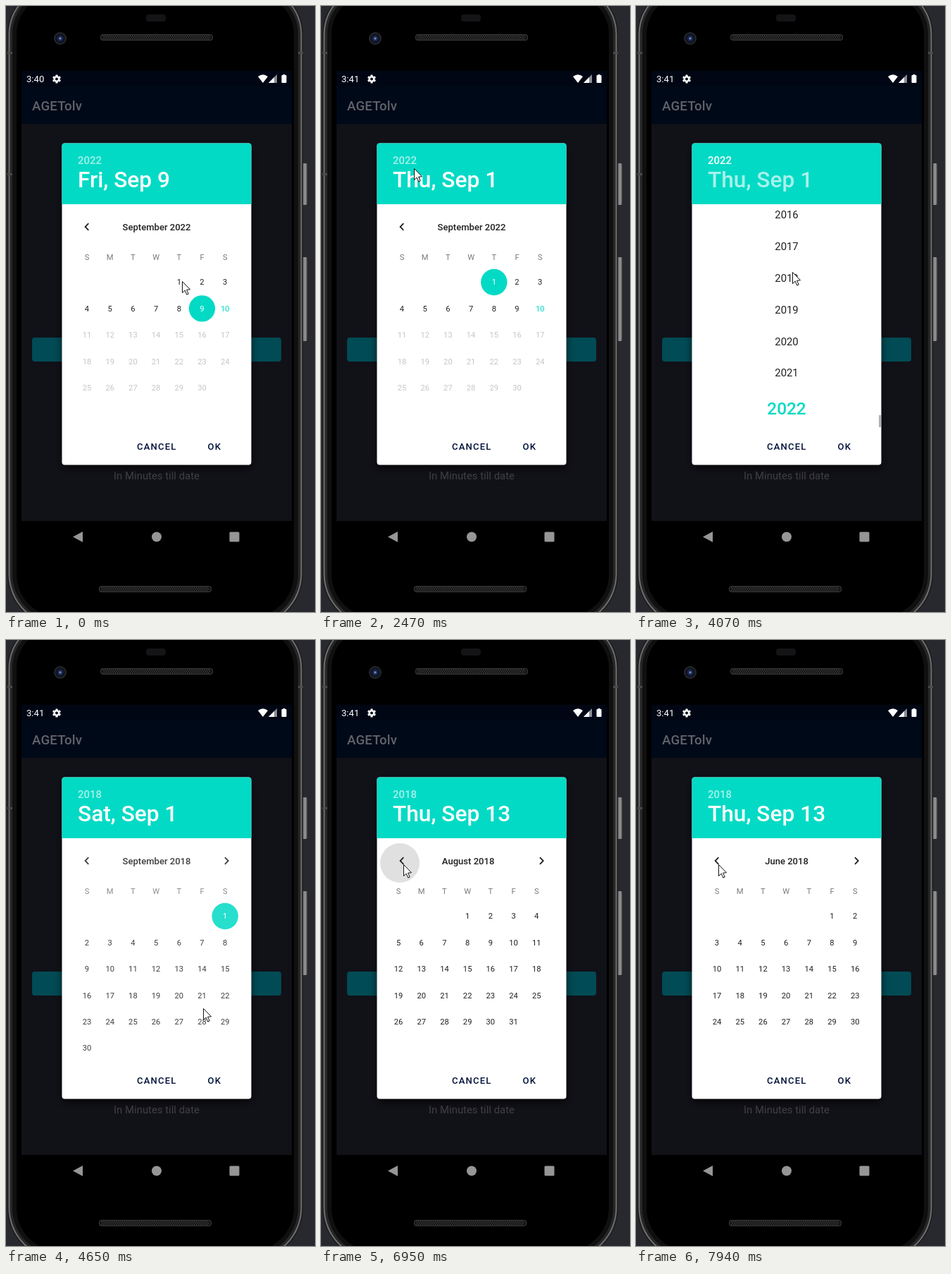
An HTML page with a canvas that plays this animation: 439x859 px, repeating every 8 s.

```html
<!DOCTYPE html>
<html lang="en">
<head>
<meta charset="utf-8">
<title>Date picker</title>
<style>
html, body { margin: 0; width: 100%; height: 100%; overflow: hidden; background: #28282f; }
canvas { display: block; }
</style>
</head>
<body>
<canvas id="stage"></canvas>
<script>
const W = 439, H = 859, LOOP = 8000;
const STEP = 144.6, LEAD = 15;
const TEAL = '#03dac5', INK = '#212121', NAVY = '#00113a';
const MONTHS = ['January', 'February', 'March', 'April', 'May', 'June', 'July',
  'August', 'September', 'October', 'November', 'December'];
const DAYS = ['Sun', 'Mon', 'Tue', 'Wed', 'Thu', 'Fri', 'Sat'];
const TODAY = new Date(2022, 8, 10);

// All times below are in steps.
const YEARS_OPEN = 21, YEARS_CLOSE = 31;
const BACK_PRESSES = [47, 50, 53];
const PICKS = [
  { from: 0, date: new Date(2022, 8, 9) },
  { from: 2, date: new Date(2022, 8, 1), press: true },
  { from: YEARS_CLOSE, date: new Date(2018, 8, 1) },
  { from: 42, date: new Date(2018, 8, 13), press: true }
];
const MOVES = [
  { from: 0, to: 1, x: 250, y: 390 },
  { from: 5, to: 9, x: 200, y: 249 },
  { from: 10, to: 12, x: 203, y: 254 },
  { from: 13, to: 17, x: 132, y: 230 },
  { from: 19, to: 21, x: 125, y: 217 },
  { from: 24, to: 28, x: 222, y: 377 },
  { from: 31, to: 33, x: 322, y: 628 },
  { from: 35, to: 39, x: 237, y: 467 },
  { from: 43, to: 47, x: 117, y: 318 }
];

const canvas = document.getElementById('stage');
const ratio = window.devicePixelRatio || 1;
canvas.width = W * ratio;
canvas.height = H * ratio;
canvas.style.width = W + 'px';
canvas.style.height = H + 'px';
const ctx = canvas.getContext('2d');

const clamp = v => Math.min(1, Math.max(0, v));
const easeOut = u => 1 - (1 - u) ** 1.25;
const sameDay = (a, b) => a.getTime() === b.getTime();
const pickAt = step => PICKS.filter(p => p.from <= step).pop().date;

function cursorAt(step) {
  let { x, y } = MOVES[0];
  for (const move of MOVES) {
    const k = easeOut(clamp((step - move.from) / (move.to - move.from)));
    x += (move.x - x) * k;
    y += (move.y - y) * k;
  }
  return [Math.round(x), Math.round(y)];
}

// The new month glides in from the left with a quintic ease.
function pageAt(step) {
  const ages = BACK_PRESSES.map(p => step - p).filter(age => age > 0);
  const shift = ages.length ? -268 * (1 - clamp(ages.pop() * .55)) ** 5 : 0;
  const turned = BACK_PRESSES.filter(p => step > p).length;
  return { year: step < YEARS_CLOSE ? 2022 : 2018, month: 8 - turned, shift };
}

function viewAt(step) {
  const closing = step >= YEARS_CLOSE;
  const sinceClose = step - YEARS_CLOSE + .8;
  return {
    calendar: clamp(closing ? sinceClose * .48 : 1 - (step - YEARS_OPEN) * .32),
    years: clamp(closing ? 1 - sinceClose * .8 : (step - YEARS_OPEN - 1.7) * .65),
    pressed: step >= YEARS_OPEN && step < YEARS_OPEN + 4,
    yearMode: step > YEARS_OPEN && !closing
  };
}

function rect(x, y, w, h, r, fill) {
  ctx.beginPath();
  ctx.roundRect(x, y, w, h, r);
  ctx.fillStyle = fill;
  ctx.fill();
}

function disc(x, y, r, fill) {
  ctx.beginPath();
  ctx.arc(x, y, r, 0, Math.PI * 2);
  ctx.fillStyle = fill;
  ctx.fill();
}

function poly(points, fill) {
  ctx.beginPath();
  points.forEach(([x, y]) => ctx.lineTo(x, y));
  ctx.closePath();
  ctx.fillStyle = fill;
  ctx.fill();
}

// y is the middle of the capitals; baselines sit on whole pixels
function text(str, x, y, size, color, { weight = 400, align = 'left', spacing = 0 } = {}) {
  ctx.font = `${weight} ${size}px Roboto, sans-serif`;
  ctx.textAlign = align;
  ctx.letterSpacing = spacing + 'px';
  ctx.fillStyle = color;
  ctx.fillText(str, x, Math.round(y + size * .356));
}

function speaker(x, y) {
  rect(x, y, 160, 9, 4, '#3a3a3a');
  rect(x + 1, y + 1, 158, 7, 3, '#151515');
  ctx.fillStyle = '#414141';
  for (let row = 0; row < 3; row++)
    for (let i = 0; i < 51; i++)
      ctx.fillRect(x + 3 + i * 3 + (row % 2) * 1.5, y + 1.5 + row * 2.2, 1.5, 1.4);
}

function sideKey(y, h) {
  const shade = ctx.createLinearGradient(420, 0, 428, 0);
  ['#222', '#777', '#999', '#444'].forEach((c, i) => shade.addColorStop(i / 3, c));
  rect(420, y, 8, h, 2, shade);
}

function shell(inset, color) {
  const top = 70 - inset, bottom = 75 - inset;
  rect(2 + inset, inset - 30, 420 - 2 * inset, 910 - 2 * inset, [top, top, bottom, bottom], color);
}

function drawPhone() {
  ctx.fillStyle = '#28282f';
  ctx.fillRect(0, 0, W, H);
  sideKey(223, 59);
  sideKey(356, 119);

  shell(0, '#1c1c1c');
  shell(1.5, '#6e6e6e');
  shell(3.5, '#262626');
  shell(7, '#101010');
  shell(13, '#000');
  ctx.fillStyle = '#4a4a4a';
  [[2, 65], [2, 237], [415, 65]].forEach(([x, y]) => ctx.fillRect(x, y, 7, 3));

  rect(199, 12, 28, 10, 4, '#141417');
  disc(77, 46, 9, '#24272d');
  disc(77, 46, 7, '#10131c');
  disc(77, 46, 4.5, '#17244a');
  disc(77, 46, 1.8, '#6f83bb');
  speaker(134, 40);
  speaker(132, 822);

  poly([[95, 752.5], [109, 745], [109, 760]], '#969696');
  disc(214, 752.5, 7, '#969696');
  rect(317.5, 745.5, 14, 14, 1.5, '#969696');
}

function drawGear(x, y) {
  ctx.save();
  ctx.translate(x, y);
  for (let i = 0; i < 6; i++) {
    rect(-1.6, -6, 3.2, 4, .6, '#fff');
    ctx.rotate(Math.PI / 3);
  }
  disc(0, 0, 4.4, '#fff');
  disc(0, 0, 2, '#00091a');
  ctx.restore();
}

function drawStatus(step) {
  text(step < 1 ? '3:40' : '3:41', 29, 103.5, 13.1, '#fff');
  drawGear(72, 103.5);

  ctx.beginPath();
  ctx.moveTo(365, 109);
  ctx.lineTo(358, 100);
  ctx.quadraticCurveTo(365, 94.5, 372, 100);
  ctx.closePath();
  ctx.fillStyle = '#fff';
  ctx.fill();

  poly([[373, 109], [385, 97], [385, 109]], '#8b8f98');
  poly([[373, 109], [381, 101], [381, 109]], '#fff');
  rect(391.5, 98, 7, 11, 1, '#fff');
  rect(393.5, 97, 3, 2, 0, '#fff');
}

function drawApp(step) {
  rect(22, 92, 384, 638, 0, '#111118');
  rect(22, 92, 384, 75, 0, '#000918');
  rect(22, 92, 384, 22, 0, '#000614');
  drawStatus(step);
  text('AGETolv', 37, 141.5, 18.7, '#60636a', { weight: 500, spacing: .2 });
  rect(37, 470, 354, 34, 4, '#004b55');
  text('In Minutes till date', 214, 666, 14.9, '#404046', { align: 'center' });
}

function drawHeader(date, { pressed, yearMode }) {
  const tone = active => active ? '#fff' : 'rgba(255,255,255,.65)';
  const label = `${DAYS[date.getDay()]}, ${MONTHS[date.getMonth()].slice(0, 3)} ${date.getDate()}`;
  rect(79.5, 194.5, 269, 86.5, [4, 4, 0, 0], TEAL);
  if (pressed) rect(95, 202, 49, 33, 1, 'rgba(0,0,0,.14)');
  text(date.getFullYear(), 102, 218.5, 14.9, tone(yearMode || pressed), { weight: 500 });
  text(label, 102, 246, 31.7, tone(!yearMode), { weight: 500 });
}

function chevron(x, dir) {
  ctx.beginPath();
  ctx.moveTo(x - 2.3 * dir, 308.2);
  ctx.lineTo(x + 2.4 * dir, 313);
  ctx.lineTo(x - 2.3 * dir, 317.8);
  ctx.strokeStyle = INK;
  ctx.lineWidth = 1.8;
  ctx.stroke();
}

function drawCalendar(step) {
  const { year, month, shift } = pageAt(step);
  const picked = pickAt(step);
  const touched = PICKS.find(p => p.press && step === p.from - 1);
  const first = new Date(year, month, 1).getDay();
  const count = new Date(year, month + 1, 0).getDate();
  const colX = col => 115 + col * 32.7 + shift;
  const ripple = (x, y, r) => disc(x, y, r, 'rgba(0,0,0,.12)');

  for (const press of BACK_PRESSES) {
    const age = step - press;
    if (age === 0 || age === 1) ripple(115 - 3 * age, 316, 16 + 12 * age);
  }
  chevron(115, -1);
  if (year < TODAY.getFullYear()) chevron(313.3, 1);
  text(`${MONTHS[month]} ${year}`, 214 + shift, 313.3, 13.07, INK, { weight: 500, align: 'center' });
  [...'SMTWTFS'].forEach((d, i) => text(d, colX(i), 356.3, 11.2, '#797979', { align: 'center' }));

  for (let day = 1; day <= count; day++) {
    const date = new Date(year, month, day);
    const cell = first + day - 1;
    const x = colX(cell % 7), y = 391.5 + Math.floor(cell / 7) * 37.35;
    let color = sameDay(date, TODAY) ? TEAL : date > TODAY ? '#c6c6c6' : INK;
    if (touched && sameDay(date, touched.date)) ripple(x, y, 18.7);
    if (sameDay(date, picked)) {
      disc(x, y, 18.7, TEAL);
      color = '#fff';
    }
    text(day, x, y, 11.2, color, { align: 'center' });
  }
}

function drawYears() {
  for (let i = 0; i < 6; i++)
    text(2016 + i, 214, 296 + i * 44.8, 14.9, INK, { align: 'center' });
  text('2022', 214, 570.5, 24.4, TEAL, { weight: 500, align: 'center' });
  rect(345, 580, 3, 17, 0, 'rgba(0,0,0,.3)');
}

function drawDialog(step) {
  const view = viewAt(step);
  ctx.save();
  ctx.shadowColor = 'rgba(0,0,0,.65)';
  ctx.shadowBlur = 12 * ratio;
  ctx.shadowOffsetY = 5 * ratio;
  rect(79.5, 194.5, 269, 456, 4, '#fff');
  ctx.restore();
  drawHeader(pickAt(step), view);

  ctx.save();
  ctx.beginPath();
  ctx.rect(80, 281, 268, 319);
  ctx.clip();
  drawCalendar(step);
  // A white veil fades the calendar as one layer.
  rect(80, 281, 268, 319, 0, `rgba(255,255,255,${1 - view.calendar})`);
  ctx.globalAlpha = view.years;
  drawYears();
  ctx.restore();

  const action = { weight: 500, spacing: 1.17 };
  text('CANCEL', 186, 624, 13.07, NAVY, action);
  text('OK', 286.5, 624, 13.07, NAVY, action);
}

function drawCursor(step) {
  const [x, y] = cursorAt(step);
  ctx.save();
  ctx.translate(x + .5, y + .5);
  poly([[0, 0], [0, 16], [3.7, 12.6], [6.3, 18.6], [8.7, 17.5], [6.1, 11.7], [11, 11.3]], '#fff');
  ctx.strokeStyle = '#111';
  ctx.lineWidth = 1;
  ctx.stroke();
  ctx.restore();
}

function render(time) {
  const step = Math.floor((time % LOOP + LEAD) / STEP);
  ctx.setTransform(ratio, 0, 0, ratio, 0, 0);
  drawPhone();
  drawApp(step);
  drawDialog(step);
  drawCursor(step);
}

let start;
function frame(now) {
  start ??= now;
  render(now - start);
  requestAnimationFrame(frame);
}
render(0);
requestAnimationFrame(frame);
</script>
</body>
</html>
```
